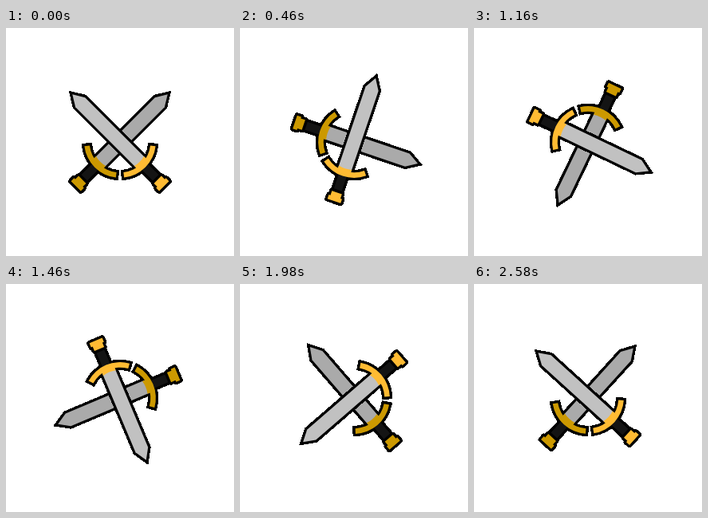
Write an HTML page that moves like this. It is 286 by 286 pixels and loops after 2600 ms.

```html
<!DOCTYPE html>
<html lang="en">
<head>
<meta charset="utf-8">
<title>Spinning swords</title>
<style>
  html, body { margin: 0; width: 100%; height: 100%; overflow: hidden; background: #fff; }
  svg { display: block; width: 100%; height: 100%; }
  .back { --steel: #aaa; --gold: #cc9900; }
  .front { --steel: #c1c1c1; --gold: #ffbb33; }
  .outline {
    --steel: #000; --gold: #000;
    stroke: #000; stroke-width: 6.8; shape-rendering: crispEdges;
  }
  .steel { fill: var(--steel); }
  .gold { fill: var(--gold); }
  .grip { fill: #141414; }
  .pommel { stroke-linejoin: round; }
</style>
</head>
<body>
<svg viewBox="0 0 286 286">
  <defs>
    <!-- Points up, with the centre of rotation at the origin -->
    <g id="faces">
      <path class="grip" d="M-5.3 42H5.3V63.4H-5.3Z"/>
      <path class="steel" d="M-8.5 42V-70.5L0 -84.5L8.5 -70.5V42Z"/>
      <path class="gold" d="M-27.9 35.2A44.9 44.9 0 0 0 27.9 35.2L23.8 30A38.3 38.3 0 0 1 -23.8 30Z"/>
      <path class="gold" d="M-8.5 34A35 35 0 0 0 8.5 34V42H-8.5Z"/>
      <path class="gold pommel" d="M-6.6 66.8H6.6V72.7H8.7V78.2H-8.7V72.7H-6.6Z"/>
    </g>
    <g id="sword">
      <use class="outline" href="#faces"/>
      <use href="#faces"/>
    </g>
  </defs>
  <g id="pair">
    <use class="back" href="#sword" transform="rotate(45)"/>
    <use class="front" href="#sword" transform="rotate(-45)"/>
  </g>
</svg>
<script>
  const LOOP = 2600, STEP = 20;
  const pair = document.getElementById('pair');
  const start = performance.now();

  function draw(now) {
    const elapsed = Math.max(0, now - start) % LOOP;
    const angle = Math.floor(elapsed / STEP) * STEP / LOOP * 360;
    pair.setAttribute('transform', `translate(143 143) rotate(${angle})`);
    requestAnimationFrame(draw);
  }
  draw(start);
</script>
</body>
</html>
```
